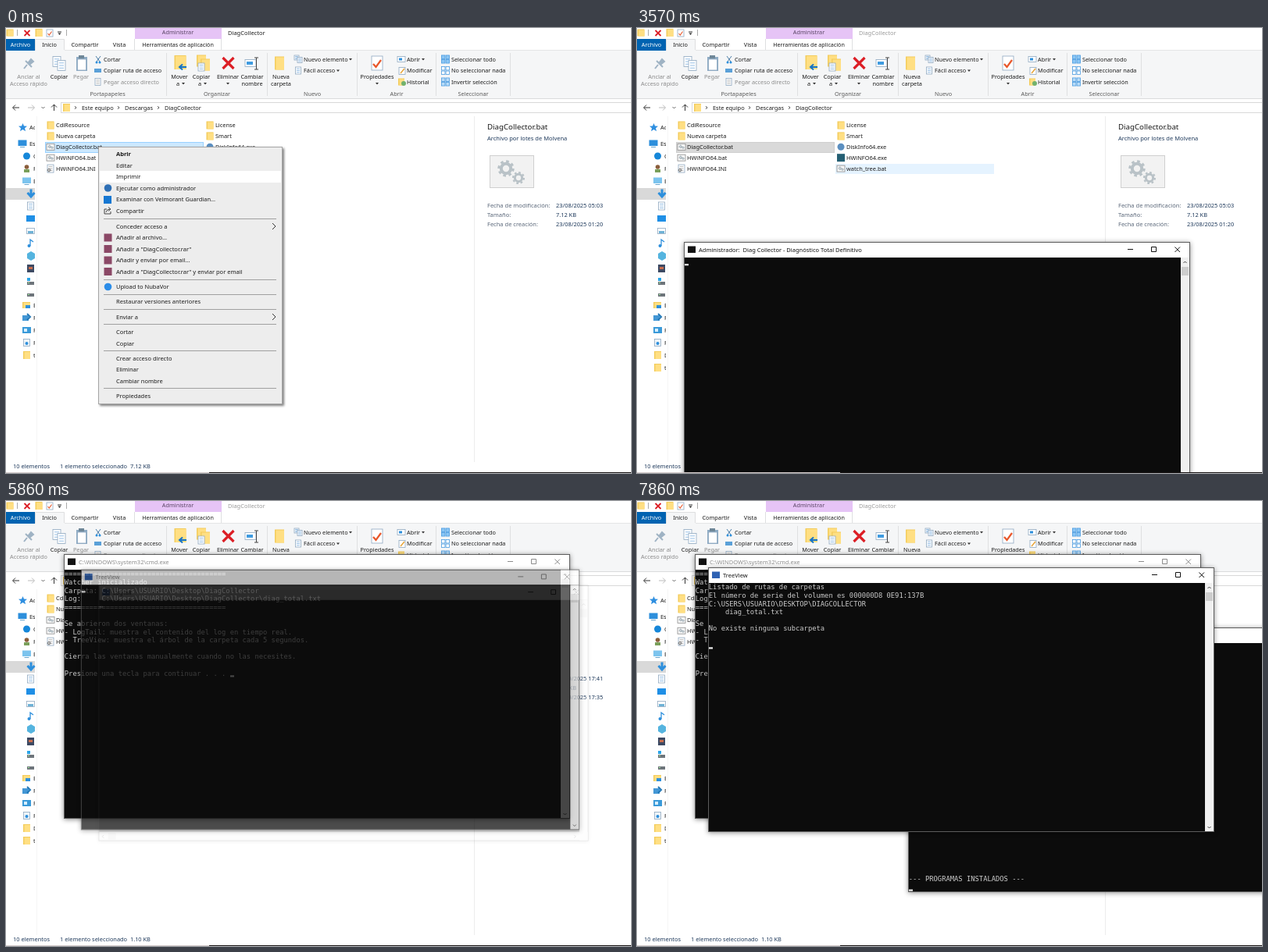
An HTML page for the animation above (8000 ms loop, 800 by 570 pixels).

```html
<!DOCTYPE html>
<html lang="es">
<head>
<meta charset="utf-8">
<title>DiagCollector</title>
<style>
html, body { margin: 0; width: 100%; height: 100%; overflow: hidden; background: #fff; }
svg { display: block; width: 800px; height: 570px; }
text { font-family: "Noto Sans", sans-serif; white-space: pre; }
text.mono { font-family: "DejaVu Sans Mono", monospace; }
.window { filter: drop-shadow(0 1px 3px rgba(0,0,0,.45)); }
</style>
</head>
<body>
<svg id="stage" viewBox="0 0 800 570"></svg>
<script>
const LOOP = 8000, STEPS_PER_SECOND = 7;
const INK = '#1b1b1b', NAVY = '#1e395b', GREY = '#8a8a8a', BLUE = '#2d8fdc';

// Drawing helpers
const rect = (x, y, w, h, fill, stroke) => stroke
  ? `<rect x="${x + .5}" y="${y + .5}" width="${w - 1}" height="${h - 1}" fill="${fill}" stroke="${stroke}"/>`
  : `<rect x="${x}" y="${y}" width="${w}" height="${h}" fill="${fill}"/>`;
const path = (d, stroke, width = 1, fill = 'none') =>
  `<path d="${d}" stroke="${stroke}" stroke-width="${width}" fill="${fill}"/>`;
const disc = (x, y, r, fill) => `<circle cx="${x}" cy="${y}" r="${r}" fill="${fill}"/>`;
const text = (x, y, s, { size = 7.4, fill = INK, anchor = 'start', weight = 400 } = {}) =>
  `<text x="${x}" y="${y + size * .36}" font-size="${size}" fill="${fill}" text-anchor="${anchor}" font-weight="${weight}">${s}</text>`;
const mid = (x, y, s, fill = INK, size = 7.3) => text(x, y, s, { size, fill, anchor: 'middle' });
const mono = (x, y, s) => `<text class="mono" x="${x}" y="${y + 3}" font-size="8.8" fill="#ccc">${s}</text>`;
const chevron = (x, y, angle, color = '#444', r = 2, width = 1) =>
  `<path transform="translate(${x} ${y}) rotate(${angle})" d="M${-r / 2} ${-r}L${r / 2} 0L${-r / 2} ${r}" fill="none" stroke="${color}" stroke-width="${width}"/>`;
const caret = (x, y) => path(`M${x - 2} ${y - 1}h4l-2 2.4z`, 'none', 0, '#333');

// Icons, placed by their centre
const folder = (x, y, w = 9, h = 10) =>
  rect(x - w / 2, y - h / 2, w, h, '#f3cc5c') + rect(x - w / 2 + 1.5, y - h / 2 + 1, w - 1.5, h - 1, '#ffdf83');
const page = (x, y, w, h, fill = '#fff', line = '#8fa8c0') =>
  `<rect x="${x - w / 2}" y="${y - h / 2}" width="${w}" height="${h}" fill="${fill}" stroke="${line}" stroke-width=".8"/>`;
const written = (x, y, w, h, line = '#7fb2e0') => page(x, y, w, h) +
  path([-.25, 0, .25].map(f => `M${x - w * .3} ${y + h * f}h${w * .6}`).join(''), line, .8);
const gear = (x, y, r, color = '#b9c2c7') =>
  `<g fill="none" stroke="${color}"><circle cx="${x}" cy="${y}" r="${r * .62}" stroke-width="${r * .4}"/>` +
  `<circle cx="${x}" cy="${y}" r="${r * .92}" stroke-width="${r * .3}" stroke-dasharray="${r * .36}"/></g>`;
const batch = (x, y) => page(x, y, 10, 8, '#f8f8f8', '#8c8c8c') + gear(x - 1.2, y - .4, 2, '#8295a0') + gear(x + 2, y + 1, 1.6, '#8295a0');
const monitor = (x, y, fill = BLUE) => rect(x - 5.5, y - 4.5, 11, 7.5, fill) + rect(x - 3, y + 4, 6, 1, '#68a5cd');
const cross = (x, y, r, w) => path(`M${x - r} ${y - r}l${2 * r} ${2 * r}M${x + r} ${y - r}l${-2 * r} ${2 * r}`, '#dc1f26', w);
const check = (x, y, r) => path(`M${x - r} ${y}l${r * .7} ${r * .8}l${r * 1.3} ${-r * 1.8}`, '#e8582c', r * .45);
const grid = (x, y, color) => [-2.8, 2.8].map(a => [-2.8, 2.8].map(b => page(x + a, y + b, 4.5, 4.5, color, '#4a9be0')).join('')).join('');

function toolbar() {
  const big = [[29, 'Anclar al', 'Acceso rápido', GREY], [68, 'Copiar', ''], [96, 'Pegar', '', GREY], [222, 'Mover', 'a'],
    [250, 'Copiar', 'a'], [284, 'Eliminar', ''], [315, 'Cambiar', 'nombre'], [352, 'Nueva', 'carpeta'], [475, 'Propiedades', '']];
  const small = [[125, 0, 'Cortar'], [125, 1, 'Copiar ruta de acceso'], [125, 2, 'Pegar acceso directo', GREY],
    [381, 0, 'Nuevo elemento'], [381, 1, 'Fácil acceso'], [513, 0, 'Abrir'], [513, 1, 'Modificar'], [513, 2, 'Historial'],
    [570, 0, 'Seleccionar todo'], [570, 1, 'No seleccionar nada'], [570, 2, 'Invertir selección']];
  const groups = [[130, 'Portapapeles'], [270, 'Organizar'], [392, 'Nuevo'], [500, 'Abrir'], [598, 'Seleccionar']];
  return folder(5, 6, 9, 9) + path('M14.5 2v8M77.5 2v8', '#aaa') + cross(27, 6.5, 3.5, 1.8) + folder(42, 6, 9, 10) +
    page(56, 6.5, 8, 9) + check(56, 7, 2.5) + path('M66 5h5', '#333') + caret(68.5, 7.5) +
    rect(165, 0, 111, 14, '#e6c4f6') + mid(220, 5.5, 'Administrar', '#5b4666') +
    rect(0, 28, 800, 63, '#f5f6f7') + rect(0, 28, 800, 1, '#e4e5e6') + rect(0, 90, 800, 1, '#dadbdc') +
    rect(38, 14, 37, 15, '#f5f6f7') + path('M37.5 28V14.5H74.5V28M164.5 28V14M275.5 28V14', '#dedfe0') +
    rect(0, 14, 37, 15, '#0063b1') + mid(18.5, 21.5, 'Archivo', '#fff') + mid(55.5, 21.5, 'Inicio') + mid(101, 21.5, 'Compartir') +
    mid(145, 21.5, 'Vista') + mid(220, 21.5, 'Herramientas de aplicación', INK, 7.15) +
    path([206, 335, 450, 551, 646].map(x => `M${x - .5} 32v55`).join(''), '#dfe0e1') +
    big.map(([x, a, b, fill = INK]) => mid(x, 62, a, fill) + mid(b === 'a' ? x - 2 : x, 71, b, fill)).join('') +
    [[227, 71], [255, 71], [284, 71], [475, 71], [441, 40], [425, 54.5], [534, 40]].map(p => caret(...p)).join('') +
    small.map(([x, row, s, fill]) => text(x, 40 + row * 14.5, s, { size: 7.3, fill })).join('') +
    groups.map(([x, s]) => mid(x, 84, s, '#5a5a5a')).join('') +
    path('M23 52l4-5M25 42l8 8M28 45l4-5l3 3l-5 4z', '#9fb3c4', 2, '#9fb3c4') +
    written(65, 43, 10, 13) + written(71, 48, 10, 13) +
    rect(90, 37, 14, 18, '#8eabc4') + page(97, 47, 11, 14) + rect(93, 35, 7, 4, '#6f8798') +
    path('M115 36l5 7M121 36l-5 7', '#4f7fa8') + disc(116, 44, 1.5, BLUE) + disc(120, 44, 1.5, BLUE) +
    rect(113, 52, 9, 5, '#5aa0d8') + written(117.5, 69, 7, 9, '#aaa') +
    folder(223, 44, 15, 18) + path('M231 50h-8M226 46.500l-4 3.500l4 3.500', '#1673c5', 2) +
    folder(250, 42, 12, 15) + folder(255, 47, 12, 15) + written(250, 50, 8, 10) + cross(284.500, 45, 7, 3.2) +
    page(313, 45, 14, 9) + rect(308, 43, 8, 4, '#3f9be0') + path('M318 38h5M320.500 38v15M318 53h5', '#444') +
    folder(350, 45, 12, 17) + written(372, 38, 6, 6) + written(376, 41, 6, 7) + written(374, 54.500, 7, 9) +
    page(475, 45, 14, 18) + check(475, 46, 5) +
    page(506, 40, 10, 7) + rect(503, 38.5, 4, 3, BLUE) + page(507, 55, 8, 9) + path('M505 58l5-6', '#e7a53a', 1.5) +
    folder(506, 69, 8, 9) + disc(509, 71, 3, '#72b26e') + grid(562.5, 40, '#8cc7f5') + grid(562.5, 54.5, '#fff') + grid(562.5, 69, '#b9dcf8');
}

function addressBar() {
  return path('M17 102H9M12 98.500L8.500 102L12 105.500', '#333') + path('M28 102h8M33 98.500l3.500 3.500l-3.500 3.500', '#bbb') +
    chevron(47.5, 102, 90, '#666') + path('M61.500 106v-8M58 101.500l3.500-3.500l3.500 3.500', '#333') +
    rect(70, 95, 735, 14, '#fff', '#d9d9d9') + folder(77.5, 102, 9, 10) +
    [89, 144, 195].map(x => chevron(x, 102, 0, '#444', 1.8)).join('') +
    text(97, 102, 'Este equipo') + text(152, 102, 'Descargas') + text(203, 102, 'DiagCollector') +
    rect(599, 113, 1, 443, '#ededed') + rect(39, 113, 1, 443, '#f6f6f6');
}

function sidebar(pinned) {
  const labels = [[30, 127, 'Acceso'], [30, 148, 'Este'], [35, 164, 'O'], [35, 180, 'P'], [35, 196, 'E'],
    [35, 355, 'E'], [35, 371, 'F'], [35, 387, 'P'], [35, 403, 'P'], [35, 419, pinned ? 'D' : 't']];
  if (pinned) labels.push([35, 435, 't']);
  const drive = y => rect(27, y - 1, 9, 4, '#6d747a') + rect(28, y, 2, 1, '#9ff09b');
  return rect(0, 205, 37, 15, '#d9d9d9') +
    path('M21.500 122l1.500 3.500l4 .3l-3 2.500l1 4l-3.500-2.200l-3.500 2.200l1-4l-3-2.500l4-.3z', 'none', 0, '#2f8fe0') +
    monitor(21, 148) + disc(26.5, 164, 4.5, '#1687d9') + disc(26.500, 178, 2.8, '#8b5e3c') + rect(23, 181, 7, 4, '#7aa05b') +
    monitor(26.5, 196, '#7cc4ee') + path('M32 206.500v8M27.500 211l4.500 5l4.500-5', BLUE, 3) + written(31.5, 228, 8, 10) +
    rect(26, 240, 11, 8, '#1f8fe6') + page(31.5, 260, 10, 7) + rect(28, 260, 7, 3, '#6eb2d6') +
    path('M31 279v-8l4 3', BLUE, 1.3) + disc(29.5, 279, 2, BLUE) +
    path('M27 289l5-3l5 3v6l-5 3l-5-3z', 'none', 0, '#55b4df') + rect(27, 303, 9, 10, '#3d4a63') + rect(29, 306, 5, 3, '#c86d4d') +
    drive(326) + rect(27, 320, 4, 4, '#2aa5e8') + drive(341) + folder(26, 355, 10, 8) + rect(25, 355, 6, 4, BLUE) +
    rect(21, 368, 8, 7, '#4397d5') + path('M27 366l4 4l-4 4', '#2379b8', 2) + rect(21, 383, 11, 8, '#3a9ad9') + rect(23, 385, 4, 4, '#d6efff') +
    page(26.5, 403, 8, 9, '#eef4f8') + disc(26.5, 404, 2, BLUE) + folder(26.5, 419) + (pinned ? folder(26.5, 435) : '') +
    `<svg width="37" height="570">${labels.map(l => text(...l)).join('')}</svg>`;
}

const FILES = [['CdiResource', 'Nueva carpeta', 'DiagCollector.bat', 'HWiNFO64.bat', 'HWiNFO64.INI'],
  ['License', 'Smart', 'DiskInfo64.exe', 'HWiNFO64.exe', 'watch_tree.bat']];

function fileIcon(name, x, y) {
  if (name.endsWith('.bat')) return batch(x, y);
  if (name.endsWith('.INI')) return written(x, y, 8, 10, '#aaa') + gear(x - 2, y + 2, 2.4, '#777');
  if (name.startsWith('Disk')) return disc(x, y, 4.5, '#5b8fc0');
  if (name.startsWith('HW')) return rect(x - 5, y - 5, 10, 10, '#245f73');
  return folder(x, y);
}

function fileList({ selected, hovered, active }) {
  return FILES.map((column, c) => column.map((name, r) => {
    const x = c ? 254 : 50, y = 124.5 + r * 13.9, top = Math.round(y - 6.5);
    const back = name === selected
      ? (active ? rect(x, top, 203, 14, '#cce8ff', '#99d1ff') : rect(x, top, 203, 14, '#d9d9d9', '#cfcfcf'))
      : name === hovered ? rect(x, top, 203, 13, '#e5f3ff') : '';
    return back + fileIcon(name, x + 7, y) + text(x + 14, y, name);
  }).join('')).join('');
}

function details(name) {
  const [edited, size, made] = name === 'watch_tree.bat'
    ? ['10/09/2025 17:41', '1.10 KB', '10/09/2025 17:35'] : ['23/08/2025 05:03', '7.12 KB', '23/08/2025 01:20'];
  const facts = [['Fecha de modificación:', edited], ['Tamaño:', size], ['Fecha de creación:', made]];
  return text(616, 126.5, name, { size: 9.7 }) + text(616, 141, 'Archivo por lotes de Molvena', { size: 7.5, fill: NAVY }) +
    rect(619, 163, 57, 42, '#f2f2f2', '#cfcfcf') + gear(640, 180, 10) + gear(656, 192, 7.5) +
    facts.map(([k, v], i) => text(616, 227 + i * 12, k, { size: 7.5, fill: '#5a6779' }) + text(704, 227 + i * 12, v, { fill: NAVY })).join('') +
    text(9, 561, '10 elementos', { fill: NAVY }) + text(69, 561, '1 elemento seleccionado  ' + size, { fill: NAVY });
}

function contextMenu(hovered) {
  const items = [[161, 'Abrir'], [176, 'Editar'], [190.5, 'Imprimir'], [205, 'Ejecutar como administrador'],
    [219.5, 'Examinar con Velmorant Guardian...'], [234.5, 'Compartir'], [254, 'Conceder acceso a'], [268.5, 'Añadir al archivo...'],
    [283, 'Añadir a "DiagCollector.rar"'], [297.5, 'Añadir y enviar por email...'], [312, 'Añadir a "DiagCollector.rar" y enviar por email'],
    [331.5, 'Upload to NubaVor'], [350.5, 'Restaurar versiones anteriores'], [370, 'Enviar a'], [389, 'Cortar'], [404, 'Copiar'],
    [423, 'Crear acceso directo'], [437.5, 'Eliminar'], [452, 'Cambiar nombre'], [471, 'Propiedades']];
  return `<g style="filter:drop-shadow(2px 2px 1.5px rgba(0,0,0,.5))">${rect(118, 152, 236, 330, '#ededed', '#a5a5a5')}</g>` +
    items.map(([y, s]) => (s === hovered ? rect(120, y - 7.5, 232, 15, '#fff') : '') +
      text(141, y, s, { size: 7.5, weight: s === 'Abrir' ? 700 : 400 })).join('') +
    path([244, 322, 341, 360, 379, 413, 461].map(y => `M125 ${y + .5}h221`).join(''), '#a0a0a0') +
    disc(130.5, 205, 4.8, '#2e6fb5') + rect(125, 215, 10, 10, '#1677d2') +
    path('M129 232h-3v6h8v-3M128 236q1-4 5-4M131 229.500l3 2.500l-3 2.500', '#333', .9) +
    [268.5, 283, 297.5, 312].map(y => rect(125.5, y - 5, 10, 10, '#8b4866')).join('') + disc(130.5, 331.5, 4.8, '#2c8de8') +
    chevron(343, 254, 0, '#333', 4) + chevron(343, 370, 0, '#333', 4);
}

// Console window: 648 x 339, with 30 rows of 120 characters
const W = 648, H = 339, ROW = 10.6, COL = 5.3;
const OPENING = [[.12, .968], [.7, .985]];

function consoleWindow({ x, y, title, icon = '#2f62b3', lines = [''], active = true, age = 9, bottomBar = false }) {
  if (age < 0) return '';
  const [opacity, scale] = OPENING[age] || [1, 1];
  const ink = active ? '#111' : '#8c8c8c', last = lines.length - 1;
  const horizontal = bottomBar ? rect(1, H - 12, W - 2, 11, '#f0f0f0') + chevron(6, H - 6, 180) + chevron(W - 18, H - 6, 0) + rect(13, H - 11, 10, 9, '#cdcdcd') : '';
  return `<g class="window" opacity="${opacity}" transform="translate(${x + W / 2} ${y + H / 2}) scale(${scale}) translate(${-W / 2} ${-H / 2})">` +
    rect(0, 0, W, H, '#0c0c0c', '#5c5c5c') + rect(1, 1, W - 2, 19, '#fff') + rect(5, 5.5, 10, 8.5, icon) +
    text(19, 10, title, { size: 7.5, fill: ink }) +
    path('M568 9.500h7M598.500 6.500h6v6h-6zM628.500 6.500l6.500 6.500M635 6.500l-6.500 6.500', ink) +
    rect(636, 20, 11, H - 21, '#f0f0f0') + rect(637, 32, 9, 11, '#cdcdcd') + chevron(641.5, 26, -90) + chevron(641.5, 333, 90) + horizontal +
    lines.map((s, i) => s && mono(.8, 20 + (i + .5) * ROW, s)).join('') +
    rect(1 + lines[last].length * COL, 20 + (last + 1) * ROW - 2.5, 5, 2.2, '#eee') + '</g>';
}

const HOME = 'C:\\Users\\USUARIO\\Desktop\\DiagCollector', RULE = '='.repeat(39);
const WATCHER = [RULE, 'Watcher inicializado', 'Carpeta: ' + HOME, 'Log:     ' + HOME + '\\diag_total.txt', RULE, '',
  'Se abrieron dos ventanas:', '- LogTail: muestra el contenido del log en tiempo real.',
  '- TreeView: muestra el árbol de la carpeta cada 5 segundos.', '',
  'Cierra las ventanas manualmente cuando no las necesites.', '', 'Presione una tecla para continuar . . . '];
const TREE = ['Listado de rutas de carpetas', 'El número de serie del volumen es 000000D8 0E91:137B', HOME.toUpperCase(),
  '    diag_total.txt', '', 'No existe ninguna subcarpeta', '', ''];
const PARTITION = ('Access=|Availability=|BlockSize=512|Bootable=FALSE|BootPartition=FALSE|ConfigManagerErrorCode=|ConfigManagerUserConfig=|' +
  'CreationClassName=Win32_DiskPartition|Description=GPT: Basic Data|DeviceID=Disk #0, Partition #2|DiskIndex=0|ErrorCleared=|' +
  'ErrorDescription=|ErrorMethodology=|HiddenSectors=|Index=2|InstallDate=|LastErrorCode=|Name=Disk #0, Partition #2|' +
  'NumberOfBlocks=467599360|PNPDeviceID=|PowerManagementCapabilities=|PowerManagementSupported=|PrimaryPartition=TRUE|Purpose=|' +
  'RewritePartition=|Size=239410872320|StartingOffset=645922816|Status=|StatusInfo=|Type=GPT: Basic Data')
  .split('|').flatMap(s => [s, '']).concat(Array(4).fill(''));
const LOG = [...PARTITION, ...PARTITION, ...PARTITION, ...Array(9).fill(''), '--- PROGRAMAS INSTALADOS ---', ''];
const LOG_PAUSE = 2 * PARTITION.length + PARTITION.indexOf('ConfigManagerUserConfig=');

// Each key: step, then values to interpolate
function track(keys, k) {
  if (k <= keys[0][0]) return keys[0].slice(1);
  const i = keys.findIndex(key => key[0] >= k);
  if (i < 0) return keys[keys.length - 1].slice(1);
  const a = keys[i - 1], b = keys[i], f = (k - a[0]) / (b[0] - a[0]);
  return a.slice(1).map((v, n) => v + (b[n + 1] - v) * f);
}
const COLLECTOR_MOVE = [[19, 57, 51], [20, 57.5, 85], [22, 59.5, 240], [23, 60, 274]];
const TAIL_MOVE = [[44, 108, 102], [48, 223, 191], [51, 347, 162]];
const TAIL_SCROLL = [[43, LOG_PAUSE - 60], [48, LOG_PAUSE], [51, LOG.length - 1]];

const BACKDROP = rect(0, 0, 800, 570, '#fff') + toolbar() + addressBar();
const TASKBAR = rect(0, 569, 260, 1, '#d5cccc') + rect(260, 569, 540, 1, '#181414');

function explorer(k) {
  const selected = k < 28 ? 'DiagCollector.bat' : 'watch_tree.bat';
  const hovered = k >= 24 && k < 28 ? 'watch_tree.bat' : k >= 32 && k < 36 ? 'HWiNFO64.INI' : '';
  const active = k < 14 || (k >= 28 && k < 39);
  return BACKDROP + text(284, 6.5, 'DiagCollector', { size: 7.5, fill: active ? INK : '#999' }) +
    sidebar(k >= 9) + fileList({ selected, hovered, active }) + details(selected) +
    (k < 5 ? contextMenu(k < 2 ? 'Imprimir' : 'Ejecutar como administrador') : '');
}

function scene(k) {
  let out = explorer(k);
  if (k < 28) {
    const [x, y] = track(COLLECTOR_MOVE, k);
    out += consoleWindow({ x, y, title: 'Administrador:  Diag Collector - Diagnóstico Total Definitivo', icon: '#111', age: k - 14 });
  }
  out += consoleWindow({ x: 74, y: 68, title: 'C:\\WINDOWS\\system32\\cmd.exe', icon: '#111', lines: WATCHER, active: k < 40, age: k - 38 });
  const [x, y] = track(TAIL_MOVE, k), end = Math.round(track(TAIL_SCROLL, k)[0]);
  const treeInFront = k >= 53;
  const tree = consoleWindow({ x: 91, y: 85, title: 'TreeView', lines: k < 42 ? [''] : TREE, active: k < 41 || treeInFront, age: k - 40 });
  const tail = consoleWindow({ x, y, title: 'LogTail', lines: k < 43 ? [''] : LOG.slice(end - 29, end + 1),
    active: !treeInFront, age: k - 41, bottomBar: k < 43 });
  out += treeInFront ? tail + tree : tree + tail;
  if (k >= 44 && k <= 51)
    out += `<g transform="translate(${x + 224} ${y + 11})">${path('M.5 0v10l2.300-2l1.700 3.500l1.500-.7l-1.700-3.400h3z', '#111', .8, '#fff')}</g>`;
  return out + TASKBAR;
}

const stage = document.getElementById('stage');
let shown = -1;
function draw(now) {
  const k = Math.floor((now % LOOP + 4) * STEPS_PER_SECOND / 1000) % (LOOP * STEPS_PER_SECOND / 1000);
  if (k !== shown) stage.innerHTML = scene(shown = k);
}
const start = performance.now();
function tick() {
  draw(performance.now() - start);
  requestAnimationFrame(tick);
}
tick();
</script>
</body>
</html>
```
